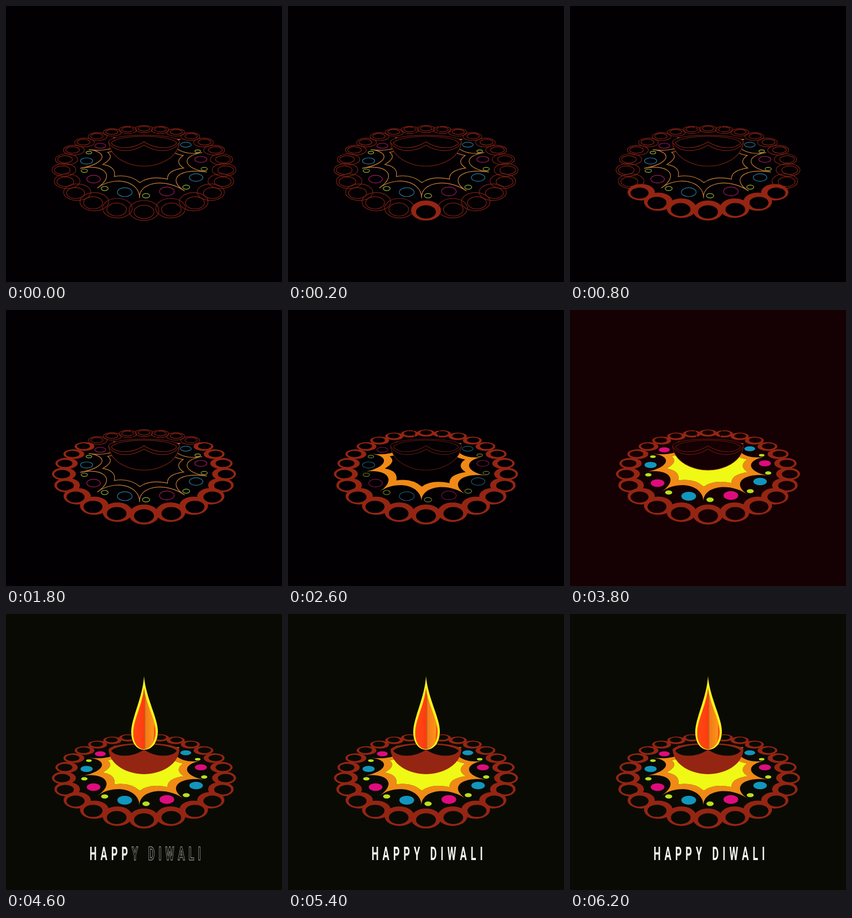
Recreate the animation shown at these times as an HTML page. Size 498 by 498 pixels, loop 6400 ms.

```html
<!DOCTYPE html>
<html lang="en">
<head>
<meta charset="utf-8">
<style>
  html, body { margin: 0; width: 100%; height: 100%; overflow: hidden; background: #020003; }
  svg { display: block; width: 100vw; height: 100vh; }
  text { font: 700 32.5px Roboto, Arial, sans-serif; letter-spacing: 12.3px; font-kerning: none; white-space: pre; }
</style>
</head>
<body>
<svg id="stage" viewBox="0 0 498 498" fill-rule="evenodd" stroke-width="1.2">
  <defs>
    <linearGradient id="fire">
      <stop offset="0" stop-color="#ff4a14"/>
      <stop offset=".46" stop-color="#ff3c10"/>
      <stop offset=".5" stop-color="#c8501a"/>
      <stop offset=".55" stop-color="#f27a18"/>
      <stop offset="1" stop-color="#ff9a18"/>
    </linearGradient>
  </defs>
</svg>
<script>
const STEP = 200, LOOP = 6400;
const BROWN = '#952513', LINE = '#7d2012';
const stage = document.getElementById('stage');
const parts = [];

function make(tag, attrs, parent = stage) {
  const el = document.createElementNS('http://www.w3.org/2000/svg', tag);
  for (const key in attrs) el.setAttribute(key, attrs[key]);
  return parent.appendChild(el);
}

// A shape is a line drawing until its time comes, then a solid fill.
function shape(d, time, fill, line = 'none', empty = 'none') {
  parts.push({ el: make('path', { d }), time, fill, line, empty });
}

// The floor pattern is a flat disc seen in perspective; 0 degrees faces the viewer.
function project(deg, r) {
  const a = deg * Math.PI / 180;
  const s = 1 / (3.916 - r * Math.cos(a));
  return { x: 249 + 547 * r * Math.sin(a) * s, y: 7.7 + 1053.6 * s, s };
}

function point(deg, r) {
  const { x, y } = project(deg, r);
  return `${x.toFixed(1)},${y.toFixed(1)} `;
}

function disc(deg, r, size) {
  const { x, y, s } = project(deg, r);
  const rx = 547 * size * s, ry = 1064 * size * s * s;
  return `M${x - rx},${y}a${rx},${ry} 0 1 0 ${2 * rx},0a${rx},${ry} 0 1 0 ${-2 * rx},0Z`;
}

// Chain of 24 rings, filled in pairs from front to back
for (let i = -11; i <= 12; i++) {
  const deg = i * 15;
  shape(disc(deg, 1, .144) + disc(deg, 1.02, .095), STEP * Math.min(Math.abs(i) + 1, 12), BROWN, LINE);
}

// Sun: hooked spikes outside, a smaller scalloped core inside
const TURN = 35.5;
let edge = 'M' + point(-3.2 - 4 * TURN, .81);
let core = 'M' + point(-5 - 4 * TURN, .53);
for (let k = -4; k < 4; k++) {
  const tip = -3.2 + k * TURN, nook = -5 + k * TURN;
  edge += 'C' + point(tip - 4, .53) + point(tip + 33, .48) + point(tip + TURN, .81);
  core += 'Q' + point(nook + 14.5, .385) + point(nook + TURN, .53);
}
shape(edge + 'Z' + core + 'Z', 2600, '#f08a16', '#cb7e36');
shape(core + 'Z', 3800, '#f0f816');

// Dots in the hollows between the spikes
for (let k = -4; k < 4; k++) {
  const d = disc(1.6 + (k + .5) * 35.4, .735, .078);
  if (k % 2) shape(d, 3000, '#1296bd', '#24789a');
  else shape(d, 2800, '#de0c7c', '#a01a58');
}
for (let k = -3; k <= 3; k++) {
  const time = 3800 - STEP * Math.max(1, Math.abs(k));
  shape(disc(1.6 + k * 35.2, .768, .038), time, '#b9e020', '#8fac38');
}

const flame = 'M249,112C247,150 226,188 226,213C226,234 237,245 249,245' +
  'C262,245 274,234 274,211C274,188 252,150 249,112Z';
make('path', { d: flame, fill: 'none', 'stroke-opacity': 1 }).style.stroke = 'var(--bg)';

// Lamp bowl
shape('M185,245C188,275 222,289 249,289C276,289 310,275 313,245' +
  'C311,237 280,233 249,233C218,233 187,237 185,245Z', 4000, BROWN, LINE, 'var(--bg)');
shape('M185,246C198,266 228,264 249,251C270,264 300,266 313,246', 4000, 'none', LINE);
shape('M190,247C195,239 225,235 249,235C273,235 303,239 308,247' +
  'C300,258 272,260 249,245C226,260 198,258 190,247Z', 4000, 'var(--bg)', LINE);

// Flame
shape(flame, 4200, '#f8f41c');
shape('M249,133C246,165 230,190 229.5,214C229,233 239,244 249,244' +
  'C259,244 271,232 270.5,211C269,188 253,165 249,133Z', 4200, 'url(#fire)');
shape('M267,199Q273,214 266,230Q268,214 267,199Z', 4200, '#ff4a14');

// Greeting
const label = make('text', { transform: 'translate(150.8 444) scale(.56 1)', 'stroke-opacity': 1, 'stroke-width': 1 });
const letters = [...'HAPPY DIWALI'].map(ch => {
  const el = make('tspan', {}, label);
  el.textContent = ch;
  return el;
});

function draw(t) {
  const bg = t < 3000 ? '#020003' : t < 3800 ? '#220000' : t < 4000 ? '#150003' : '#0a0a05';
  document.body.style.background = bg;
  stage.style.setProperty('--bg', bg);
  stage.style.strokeOpacity = t < 2600 ? 1 : .75;
  for (const { el, time, fill, line, empty } of parts) {
    const on = t >= time;
    el.style.fill = on ? fill : empty;
    el.style.stroke = on ? 'none' : line;
  }
  label.style.display = t < 4400 ? 'none' : '';
  let lit = (t - 4200) / 100;
  for (const el of letters) {
    const on = lit > 0;
    if (el.textContent !== ' ') lit--;
    el.style.fill = on ? '#f4f4ee' : 'none';
    el.style.stroke = on ? 'none' : '#c4c4bc';
  }
}

function tick() {
  draw(Math.floor(performance.now() % LOOP / STEP) * STEP);
  requestAnimationFrame(tick);
}
tick();
</script>
</body>
</html>
```
